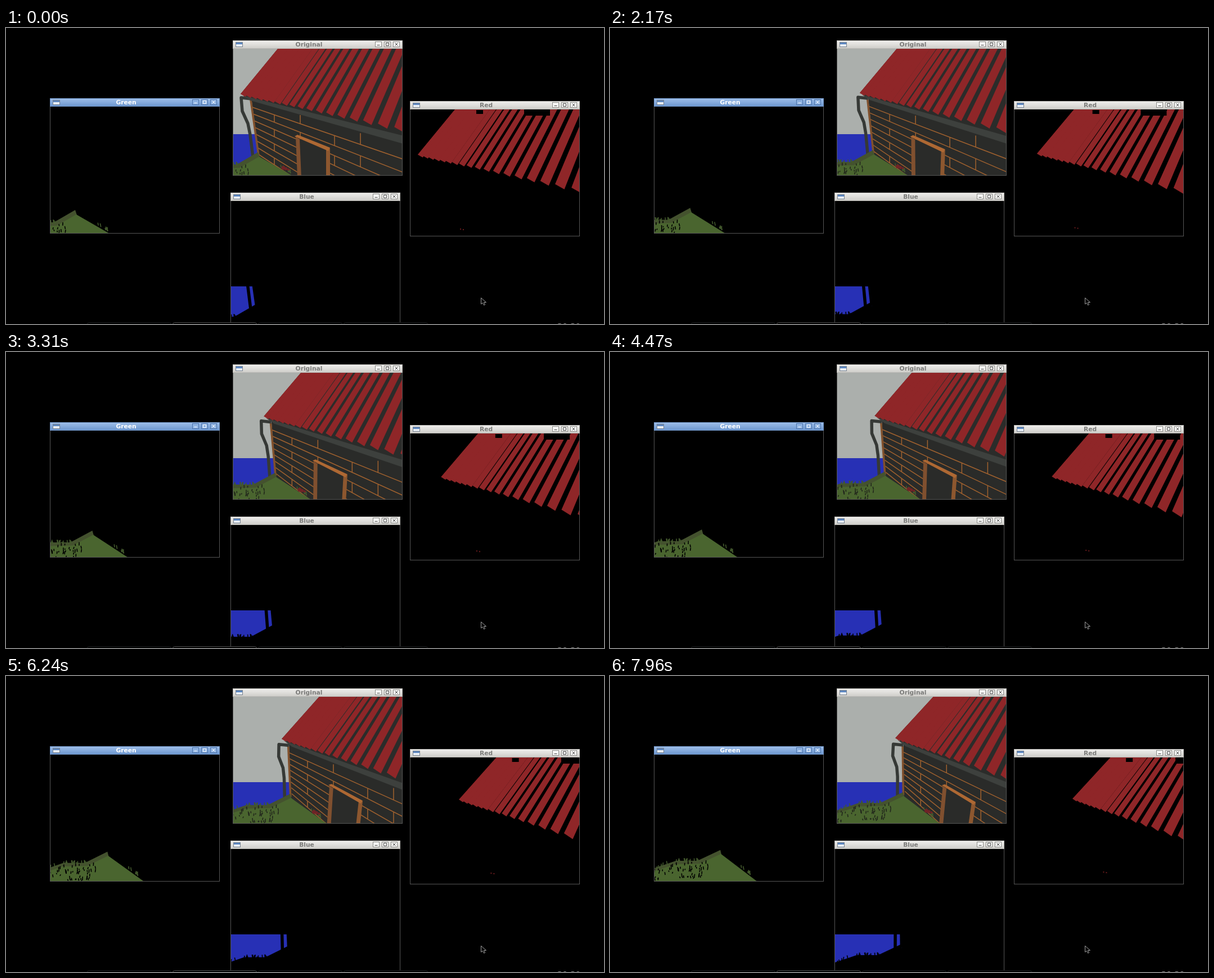
Animation of 1063x527 px, one loop 8000 ms. Source, as an HTML page with a canvas:

```html
<!DOCTYPE html>
<html lang="en">
<head>
<meta charset="utf-8">
<title>Colour filter windows</title>
<style>
  html, body { margin: 0; width: 100%; height: 100%; overflow: hidden; background: #000; }
  canvas { display: block; }
</style>
</head>
<body>
<canvas id="stage" width="1063" height="527"></canvas>
<script>
const ctx = document.getElementById('stage').getContext('2d');
const LOOP = 8000;
const REFRESH = 132; // the camera picture updates in steps

const windows = [
  { title: 'Original', x: 403, y: 22, group: 'all' },
  { title: 'Green', x: 78, y: 125, group: 'green', active: true },
  { title: 'Red', x: 718, y: 130, group: 'red' },
  { title: 'Blue', x: 399, y: 293, group: 'blue' }
];

const mix = (a, b, p) => a + (b - a) * p;

let seed = 7;
function random() {
  seed = (seed * 16807) % 2147483647;
  return seed / 2147483647;
}

// Height of the meadow left of the house, in the starting pose
const meadow = x => x < 372 ? 262 - (x - 325) * .4 : 243;

function makeBlades(count, dark, place) {
  return Array.from({ length: count }, () => {
    const [x, y] = place();
    return { x, y, h: 2 + random() * 5, lean: random() * 3 - 1.5, dark };
  });
}
const blades = [
  ...makeBlades(65, true, () => {
    const x = 333 + 98 * random() ** 1.3;
    return [x, meadow(x) + 5 + random() * 32];
  }),
  ...makeBlades(24, false, () => {
    const x = 333 + random() * 80;
    return [x, meadow(x) + 2];
  }),
  ...makeBlades(8, false, () => {
    const x = 488 + random() * 24;
    return [x, 248 + (x - 488) * .6];
  })
];

function drawScene(group, p) {
  const tone = (colour, own) => group === 'all' || group === own ? colour : '#000';

  // Where a point of the starting pose stands after the camera has panned by p
  const pan = (x, y) => [
    x + p * (86 - .13 * (y - 128)),
    y + p * (.2 * Math.max(0, x - 450) - .12 * (y - 100))
  ];

  function trace(points) {
    ctx.beginPath();
    for (const point of points) ctx.lineTo(...point);
  }
  function fill(colour, own, points) {
    trace(points);
    ctx.fillStyle = tone(colour, own);
    ctx.fill();
  }
  function stroke(colour, own, width, points) {
    trace(points);
    ctx.strokeStyle = tone(colour, own);
    ctx.lineWidth = width;
    ctx.stroke();
  }
  const panned = (...points) => points.map(([x, y]) => pan(x, y));

  ctx.lineJoin = 'round';
  ctx.fillStyle = tone('#abafac', '');
  ctx.fillRect(403, 36, 302, 153);
  ctx.fillStyle = tone('#2730b5', 'blue');
  ctx.fillRect(403, 189, 302, 75);
  drawWall();
  drawDoor();
  stroke('#363936', '', 5.5, panned([436, 126], [418, 124], [420, 148], [430, 170], [434, 190], [439, 230]));
  drawRoof();
  drawGrass();
  drawFlower();

  function drawWall() {
    fill('#2a2b29', '', panned([436, 124], [760, 120], [760, 320], [456, 320], [450, 228]));
    const corner = k => mix(436 + k * 1.6, 521 + k * .5, p);
    const course = (k, x) => mix(129 + 12 * k, 125 + 10 * k, p)
      + mix(.3 + .045 * k, .42 + .064 * k, p) * (x - corner(k));
    ctx.strokeStyle = tone('#a0612e', '');
    ctx.lineWidth = 1.5;
    ctx.beginPath();
    for (let k = 0; k < 9; k++) {
      if (k) {
        ctx.moveTo(corner(k), course(k, corner(k)));
        ctx.lineTo(720, course(k, 720));
      }
      for (let x = k % 2 ? 477 : 523; x < 640; x += 107) {
        const jx = x + 76 * p;
        ctx.moveTo(jx, course(k, jx));
        ctx.lineTo(jx, course(k + 1, jx));
      }
    }
    ctx.stroke();
    stroke('#80502c', '', 3.5, panned([435, 128], [449, 227]));
  }

  function drawDoor() {
    fill('#2a2b29', '', panned([516, 195], [574, 217], [574, 290], [519, 290]));
    fill('#80502f', '', panned([515, 194], [522, 198], [526, 290], [519, 290]));
    fill('#8d572f', '', panned([569, 217], [576, 214], [576, 290], [569, 290]));
    fill('#ae6833', '', panned([513, 193], [518, 190], [576, 213], [573, 219]));
  }

  function drawRoof() {
    const bulge = Math.sin(Math.PI * p);
    const x0 = mix(417, 508, p) + 4 * bulge, y0 = mix(117.5, 110.5, p);
    const step = mix(8.42, 6.55, p) - .12 * bulge;
    const shrink = mix(.028, .0364, p), slope = mix(.215, .352, p);
    const vanish = [mix(962, 958, p), mix(-546, -379, p)];
    const eaveX = i => x0 + step * i / (1 - shrink * i);
    const below = (x, drop) => [x, y0 + slope * (x - x0) + drop];

    // Every rib runs from the eave to one vanishing point.
    function rib(from, to, drop, colour, own) {
      const a = eaveX(from), b = eaveX(to);
      fill(colour, own, [below(a, 0), below(b, drop * (b - a)), vanish]);
    }

    const end = eaveX(20), length = end - x0;
    fill('#2b2c2a', '', [below(x0 + 8, -2), below(end, -2), below(end, .05 * length), below(x0 + 8, 3)]);
    fill('#3d403d', '', [below(x0 + 4, 2), below(end, .04 * length), below(end, 6 + .07 * length), below(x0 + 18, 8)]);
    rib(0, 20, 0, '#2b2c2a', '');
    rib(0, 4, 0, '#8f2628', 'red');
    for (let i = 0; i < 20; i++) {
      const gap = Math.min(.42, Math.max(0, (i - 3) * .08));
      rib(i, i + 1 - gap, .35, '#8f2628', 'red');
    }
    if (group === 'red') {
      ctx.fillStyle = '#000';
      ctx.fillRect(521 + 82 * p, 38, 12, 7);
      ctx.fillRect(606 + 85 * p, 36, 46, 12);
    }
  }

  function drawGrass() {
    fill('#44522e', 'green', panned([325, 262], [372, 243], [410, 243], [448, 221], [451, 230], [430, 300], [300, 300]));
    fill('#4a652f', 'green', panned([325, 268], [372, 250], [415, 249], [450, 229], [528, 274], [528, 300], [300, 300]));
    for (const { x, y, h, lean, dark } of blades) {
      const [bx, by] = pan(x, y);
      const colour = dark ? tone('#22271c', '') : tone('#43592d', 'green');
      stroke(colour, group, 1.6, [[bx, by], [bx + lean, by - h]]);
    }
  }

  function drawFlower() {
    const [x, y] = pan(495, 250);
    if (group === 'red') {
      ctx.fillStyle = '#6a1b1d';
      ctx.fillRect(x - 3, y - 1, 2, 2);
      ctx.fillRect(x + 2, y, 2, 2);
    } else if (group === 'all') {
      ctx.fillStyle = '#702326';
      for (let i = 0; i < 3; i++) {
        ctx.beginPath();
        ctx.arc(x - 2 + 4.5 * i, y - 1 + 1.5 * i, 3.5 - .7 * i, 0, 7);
        ctx.fill();
      }
    }
  }
}

function drawFrame({ title, x, y, active }) {
  const bar = ctx.createLinearGradient(0, y, 0, y + 14);
  bar.addColorStop(0, active ? '#a0c0ea' : '#f1f0ee');
  bar.addColorStop(1, active ? '#6e98d0' : '#cfceca');
  ctx.fillStyle = bar;
  ctx.fillRect(x, y, 302, 15);
  ctx.lineWidth = 1;
  ctx.strokeStyle = '#555';
  ctx.strokeRect(x + .5, y + 14.5, 301, 226);
  ctx.strokeStyle = active ? '#6f93c4' : '#b8b7b3';
  ctx.strokeRect(x + .5, y + .5, 301, 14);

  ctx.fillStyle = active ? '#fff' : '#7b7b79';
  ctx.font = 'bold 10.7px "DejaVu Sans", sans-serif';
  ctx.textAlign = 'center';
  ctx.fillText(title, x + 135.5, y + 10.5);

  ctx.fillStyle = '#e8eef5';
  ctx.fillRect(x + 5, y + 3, 13, 9);
  ctx.fillStyle = '#5d87c0';
  ctx.fillRect(x + 5, y + 3, 13, 4);
  ctx.strokeStyle = '#77818d';
  ctx.strokeRect(x + 5.5, y + 3.5, 12, 8);

  for (let i = 0; i < 3; i++) {
    const bx = x + 253.5 + i * 16, by = y + 2.5;
    ctx.fillStyle = active ? '#8fb3e2' : '#f7f7f5';
    ctx.fillRect(bx, by, 11, 9);
    ctx.strokeStyle = active ? '#4a71a8' : '#8a8a87';
    ctx.strokeRect(bx, by, 11, 9);
    ctx.strokeStyle = active ? '#fff' : '#444';
    ctx.beginPath();
    if (i === 0) {
      ctx.moveTo(bx + 3, by + 6);
      ctx.lineTo(bx + 8, by + 6);
    } else if (i === 1) {
      ctx.rect(bx + 3, by + 2, 5, 5);
    } else {
      ctx.moveTo(bx + 3, by + 2);
      ctx.lineTo(bx + 8, by + 7);
      ctx.moveTo(bx + 8, by + 2);
      ctx.lineTo(bx + 3, by + 7);
    }
    ctx.stroke();
  }
}

function drawDesktop() {
  ctx.fillStyle = '#000';
  ctx.fillRect(0, 524, 1063, 3);
  ctx.lineWidth = 1;
  for (let i = 0; i < 4; i++) {
    ctx.strokeStyle = i === 1 ? '#4c4c4c' : '#1b1d1f';
    ctx.beginPath();
    ctx.roundRect(144.5 + i * 152, 524.5, 149, 20, 3);
    ctx.stroke();
  }
  ctx.fillStyle = '#999';
  ctx.font = 'bold 13px "DejaVu Sans", sans-serif';
  ctx.textAlign = 'left';
  ctx.fillText('20:30', 980, 535);

  ctx.beginPath();
  for (const [x, y] of [[0, 0], [0, 11], [3, 9], [5, 13], [7, 12], [5, 8], [9, 8]]) ctx.lineTo(844.5 + x, 480.5 + y);
  ctx.closePath();
  ctx.strokeStyle = '#a0a0a0';
  ctx.stroke();
}

function draw(now) {
  const time = now % LOOP;
  const p = Math.floor(time / REFRESH) * REFRESH / LOOP;
  ctx.fillStyle = '#000';
  ctx.fillRect(0, 0, 1063, 527);
  for (const w of windows) {
    drawFrame(w);
    ctx.save();
    ctx.beginPath();
    ctx.rect(w.x + 1, w.y + 15, 300, 225);
    ctx.clip();
    ctx.translate(w.x - 403, w.y - 22);
    drawScene(w.group, p);
    ctx.restore();
  }
  drawDesktop();
}

const start = performance.now();
function tick() {
  draw(performance.now() - start);
  requestAnimationFrame(tick);
}
tick();
</script>
</body>
</html>
```
